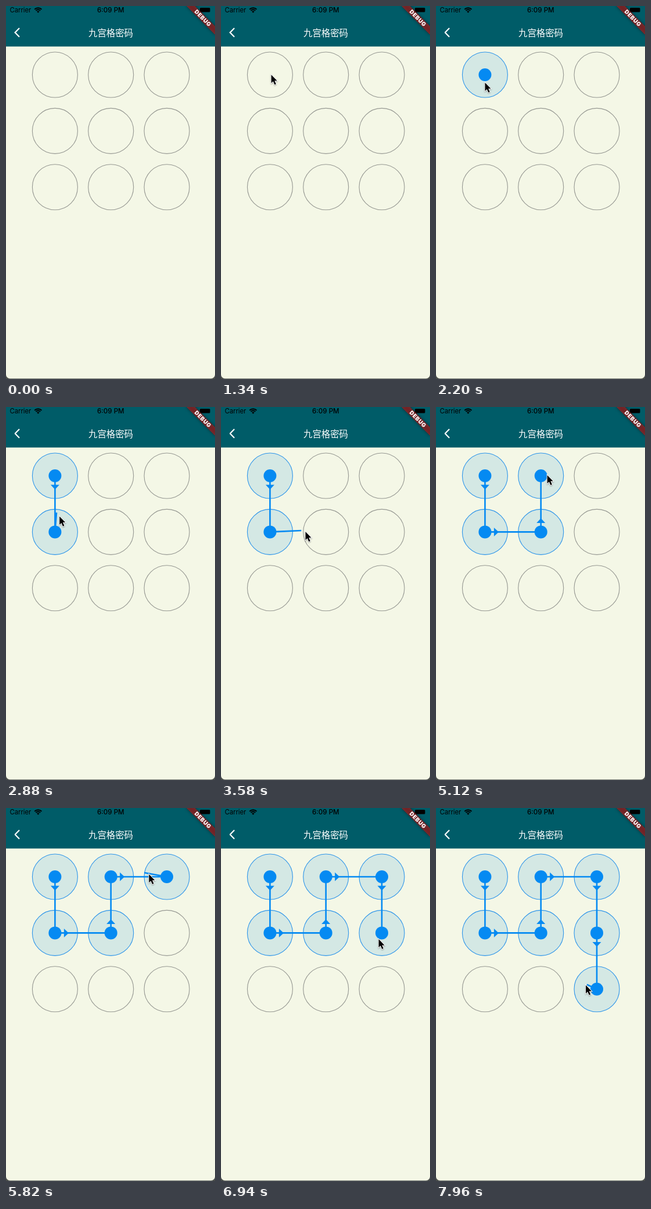
An HTML page with a canvas that plays this animation: 360x640 px, repeating every 8 s.

```html
<!DOCTYPE html>
<html lang="zh">
<head>
<meta charset="utf-8">
<title>九宫格密码</title>
<style>
html, body { margin: 0; width: 100%; height: 100%; overflow: hidden; background: #f4f7e6; }
canvas { display: block; width: 360px; height: 640px; }
</style>
</head>
<body>
<canvas id="stage"></canvas>
<script>
const W = 360, H = 640, LOOP = 8000;
const PRESS = 1900, LAG = 100;
const SCALE = W / 414;
const R = 39, HIT = 41, DOT = 11;
const BLUE = '#058af2', TEAL = '#005c68', PAPER = '#f4f7e6';

const canvas = document.getElementById('stage');
const ctx = canvas.getContext('2d');
const dpr = window.devicePixelRatio || 1;
canvas.width = W * dpr;
canvas.height = H * dpr;
ctx.scale(dpr, dpr);

const cells = Array.from({ length: 9 }, (_, i) => ({
  x: 84.4 + (i % 3) * 96.3,
  y: 118 + Math.floor(i / 3) * 96.4
}));

// Key points of the pointer path: time, x, y
const path = [
  [40, 364, 476], [1000, 86, 117], [PRESS, 86, 117], [2780, 87, 181], [3600, 146, 213],
  [4180, 165, 183], [4280, 166, 167], [5000, 184, 120], [5720, 238, 111],
  [6200, 270, 140], [6940, 271, 224], [7560, 265, 268], [7860, 260, 303], [LOOP, 257, 303]
];

// Slope at a key point; flat where the direction turns
function slope(i, k) {
  const a = path[Math.max(i - 1, 0)], b = path[Math.min(i + 1, path.length - 1)];
  const p = path[i];
  if ((p[k] - a[k]) * (b[k] - p[k]) <= 0) return 0;
  return (b[k] - a[k]) / (b[0] - a[0]);
}

function pointer(t) {
  let i = 0;
  while (i < path.length - 2 && t >= path[i + 1][0]) i++;
  const a = path[i], b = path[i + 1], span = b[0] - a[0];
  const u = Math.min(Math.max((t - a[0]) / span, 0), 1), v = 1 - u;
  const hermite = k =>
    a[k] * (1 + 2 * u) * v * v + slope(i, k) * span * u * v * v
    + b[k] * u * u * (3 - 2 * u) - slope(i + 1, k) * span * u * u * v;
  return { x: hermite(1), y: hermite(2) };
}

const touch = t => pointer(t - LAG);

// Cells in the order the finger enters them
const hits = [];
for (let t = PRESS; t < LOOP; t += 10) {
  const p = touch(t);
  for (const cell of cells) {
    const isNew = !hits.some(h => h.cell === cell);
    if (isNew && Math.hypot(p.x - cell.x, p.y - cell.y) < HIT) hits.push({ cell, t });
  }
}

function disc(p, r, fill, stroke) {
  ctx.beginPath();
  ctx.arc(p.x, p.y, r, 0, Math.PI * 2);
  if (fill) { ctx.fillStyle = fill; ctx.fill(); }
  if (stroke) { ctx.strokeStyle = stroke; ctx.lineWidth = 1.1; ctx.stroke(); }
}

function poly(points, close) {
  ctx.beginPath();
  points.forEach(([x, y]) => ctx.lineTo(x, y));
  if (close) ctx.closePath();
}

function text(str, x, y, font, color, align = 'center') {
  ctx.font = font;
  ctx.fillStyle = color;
  ctx.textAlign = align;
  ctx.textBaseline = 'middle';
  ctx.fillText(str, x, y);
}

function arrow(from, to) {
  ctx.save();
  ctx.translate(from.x, from.y);
  ctx.rotate(Math.atan2(to.y - from.y, to.x - from.x));
  poly([[15.5, -7.5], [23.5, 0], [15.5, 7.5]], true);
  ctx.fillStyle = BLUE;
  ctx.fill();
  ctx.restore();
}

function wifi() {
  ctx.save();
  ctx.translate(55.3, 11.8);
  ctx.strokeStyle = ctx.fillStyle = '#000';
  ctx.lineWidth = 1.9;
  const from = -Math.PI * 0.75, to = -Math.PI * 0.25;
  for (const r of [8.6, 5.5]) {
    ctx.beginPath();
    ctx.arc(0, 0, r, from, to);
    ctx.stroke();
  }
  ctx.beginPath();
  ctx.moveTo(0, 0);
  ctx.arc(0, 0, 3.2, from, to);
  ctx.fill();
  ctx.restore();
}

function banner() {
  ctx.save();
  ctx.translate(W, 0);
  ctx.rotate(Math.PI / 4);
  ctx.scale(SCALE, SCALE);
  ctx.filter = 'blur(2.5px)';
  ctx.fillStyle = 'rgba(0,0,0,.5)';
  ctx.fillRect(-40, 28, 80, 12);
  ctx.filter = 'none';
  ctx.fillStyle = 'rgba(183,28,28,.627)';
  ctx.fillRect(-40, 28, 80, 12);
  ctx.letterSpacing = '0.7px';
  text('DEBUG', 0, 34.4, '900 11px Inter, Roboto, sans-serif', '#fff');
  ctx.restore();
}

function header() {
  ctx.fillStyle = TEAL;
  ctx.fillRect(0, 0, W, 69.5);
  text('Carrier', 6.4, 7.5, '400 11.3px Inter, sans-serif', '#000', 'left');
  wifi();
  text('6:09 PM', 180.3, 7.5, '500 11.6px Inter, sans-serif', '#000');
  ctx.fillStyle = '#000';
  ctx.beginPath();
  ctx.roundRect(334, 3, 17.5, 7.5, 1.5);
  ctx.fill();
  poly([[23, 38], [15.6, 45.5], [23, 53]]);
  ctx.strokeStyle = '#fff';
  ctx.lineWidth = 2.2;
  ctx.stroke();
  text('九宫格密码', 180.5, 46, '500 15.4px "Noto Sans CJK SC", "Noto Sans CJK", sans-serif', '#fff');
  banner();
}

function corners() {
  ctx.fillStyle = '#4b4f4c';
  ctx.beginPath();
  ctx.rect(0, 600, W, 40);
  ctx.roundRect(0, 600, W, 39.2, [0, 0, 7, 7]);
  ctx.fill('evenodd');
}

function lock(t) {
  const done = hits.filter(h => h.t <= t).map(h => h.cell);
  for (const cell of cells) {
    if (done.includes(cell)) disc(cell, R, '#d4e8e4', '#2d95ea');
    else disc(cell, R, null, '#969892');
  }
  if (!done.length) return;
  const line = [...done, touch(t)];
  poly(line.map(p => [p.x, p.y]));
  ctx.strokeStyle = BLUE;
  ctx.lineWidth = 3 * SCALE;
  ctx.lineJoin = 'bevel';
  ctx.stroke();
  done.forEach((cell, i) => {
    disc(cell, DOT, BLUE);
    if (i) arrow(done[i - 1], cell);
  });
}

function cursor(t) {
  if (t < path[0][0]) return;
  const p = pointer(t);
  ctx.save();
  ctx.translate(p.x + 0.6, p.y + 1);
  poly([[0, 0], [0, 14.2], [3.2, 11.2], [5.8, 17], [8.2, 16], [5.7, 10.3], [10, 10.3]], true);
  ctx.lineJoin = 'miter';
  ctx.shadowColor = 'rgba(0,0,0,.35)';
  ctx.shadowBlur = 2 * dpr;
  ctx.shadowOffsetY = dpr;
  ctx.strokeStyle = '#fff';
  ctx.lineWidth = 1.8;
  ctx.stroke();
  ctx.shadowColor = 'transparent';
  ctx.fillStyle = '#000';
  ctx.fill();
  ctx.restore();
}

function draw(t) {
  ctx.fillStyle = PAPER;
  ctx.fillRect(0, 0, W, H);
  lock(t);
  header();
  corners();
  cursor(t);
}

const start = performance.now();
function tick() {
  draw((performance.now() - start) % LOOP);
  requestAnimationFrame(tick);
}
tick();
</script>
</body>
</html>
```
